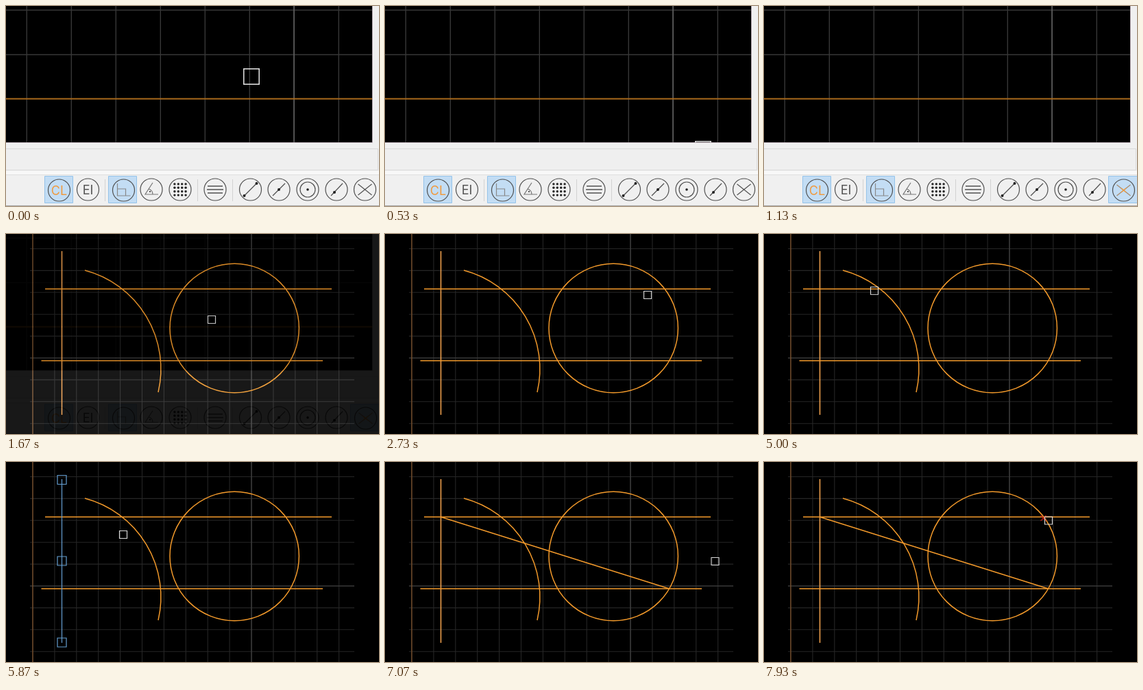
Animation of 544x292 px, one loop 8000 ms. Source, as an HTML page:

```html
<!DOCTYPE html>
<html lang="en">
<head>
<meta charset="utf-8">
<title>Intersection snap</title>
<style>
html, body { margin: 0; width: 100%; height: 100%; overflow: hidden; background: #000; }
svg { display: block; width: 544px; height: 292px; }
.icons { fill: none; stroke: #505050; stroke-width: 1.2; }
.icons .face { fill: #fbfbfb; }
.icons .dot { fill: #222; stroke: none; }
.icons text { stroke: none; font: 18px Inter, Arial, sans-serif; text-anchor: middle; }
.active { fill: #c3ddf4; stroke: #94c3ea; stroke-width: 1; }
.draft { fill: none; stroke: #f39a2b; stroke-width: 1.5; }
.grips { fill: none; stroke: #659fd2; stroke-width: 1.2; }

/* One 8 s clock drives everything: 1% = 80 ms */
.anim { animation: 8s linear infinite both; }
.drawing { animation-name: dissolve; }
.reach { animation-name: reach; animation-timing-function: ease-in-out; }
.press { animation-name: press; animation-timing-function: step-end; }
.tour { animation-name: tour; animation-timing-function: ease-in-out; }
.snap { animation-name: snap; animation-timing-function: step-end; }
.picked { animation-name: picked; animation-timing-function: step-end; }
.plain { animation-name: plain; animation-timing-function: step-end; }
.result { animation-name: result; animation-timing-function: step-end; }

@keyframes dissolve { 0%, 15% { opacity: 0 } 21.5%, 100% { opacity: 1 } }
@keyframes reach {
  0%, .8% { transform: translate(358px, 103px) }
  10.8%, 100% { transform: translate(523px, 268px) }
}
@keyframes press { 0% { opacity: 0 } 10.87%, 100% { opacity: 1 } }
@keyframes tour {
  0%, 21% { transform: translate(300px, 125px) }
  27% { transform: translate(262px, 84px) }
  34.1% { transform: translate(383px, 89px) }
  37.5% { transform: translate(411px, 83px) }
  43.5% { transform: translate(417px, 188px) }
  48.5% { transform: translate(256px, 188px) }
  52.4%, 55% { transform: translate(228.5px, 187px) }
  59.1%, 60.5% { transform: translate(171px, 83px) }
  69.1% { transform: translate(82px, 81px) }
  73.36% { transform: translate(82px, 81px); animation-timing-function: step-end }
  73.37%, 74.9% { transform: translate(171px, 106px) }
  82.5%, 85.8% { transform: translate(417px, 187px) }
  88.3%, 89.2% { transform: translate(481.5px, 145px) }
  96% { transform: translate(428px, 95px) }
  99.1%, 100% { transform: translate(415px, 85.5px) }
}
@keyframes snap {
  0% { transform: translate(258.5px, 80.5px); opacity: 0 }
  26% { transform: translate(258.5px, 80.5px); opacity: 1 }
  28.5% { transform: translate(407.5px, 80.5px); opacity: 0 }
  36.5% { transform: translate(407.5px, 80.5px); opacity: 1 }
  39% { transform: translate(414.5px, 185px); opacity: 0 }
  42.8% { transform: translate(414.5px, 185px); opacity: 1 }
  44.5% { transform: translate(251px, 185px); opacity: 0 }
  48% { transform: translate(251px, 185px); opacity: 1 }
  49.5% { transform: translate(225.5px, 185px); opacity: 0 }
  51.8% { transform: translate(225.5px, 185px); opacity: 1 }
  55.8% { transform: translate(168.5px, 80.5px); opacity: 0 }
  58.5% { transform: translate(168.5px, 80.5px); opacity: 1 }
  62% { transform: translate(81.5px, 80.5px); opacity: 0 }
  67.5% { transform: translate(81.5px, 80.5px); opacity: 1 }
  73.37% { transform: translate(414.5px, 185px); opacity: 0 }
  81.8% { transform: translate(414.5px, 185px); opacity: 1 }
  85.9% { transform: translate(407.5px, 82px); opacity: 0 }
  98.2%, 100% { transform: translate(407.5px, 82px); opacity: 1 }
}
@keyframes picked { 0% { opacity: 0 } 73.37% { opacity: 1 } 85.87%, 100% { opacity: 0 } }
@keyframes plain { 0% { opacity: 1 } 73.37% { opacity: 0 } 85.87%, 100% { opacity: 1 } }
@keyframes result { 0% { opacity: 0 } 84.12%, 100% { opacity: 1 } }
</style>
</head>
<body>
<svg viewBox="0 0 544 292">
  <defs>
    <clipPath id="viewport"><path d="M0 0H534V199H0z"/></clipPath>
    <circle id="face" class="face" r="16"/>
  </defs>

  <g>
    <path d="M0 0H544V292H0z" fill="#f0f0f0"/>
    <path d="M0 0H534V199H0z"/>
    <path d="M0 199.5H534.5V0" fill="none" stroke="#c9bcc4"/>
    <g clip-path="url(#viewport)">
      <g id="coarse" stroke="#373737" stroke-width="1.4"></g>
      <path d="M420 0V199" stroke="#666" stroke-width="1.4"/>
      <path d="M0 135.5H534" stroke="#a96a1c" stroke-width="1.8"/>
      <path class="anim reach" d="M-11.2 -11.2H11.2V11.2H-11.2z" fill="none" stroke="#e8e8e8" stroke-width="1.5"/>
    </g>
    <path d="M-1 208.500H542.500V239.500H-1z" fill="#efefef" stroke="#dadada"/>
    <path d="M0 241H544V246H0z" fill="#f8f8f8"/>
    <path d="M0 246.500H544" stroke="#dedede"/>
    <path d="M0 291.500H544" stroke="#a8a8a8"/>
    <path d="M144.500 253V285M279.500 253V285M330.500 253V285" stroke="#d2d2d2"/>

    <g class="icons">
      <path class="active" d="M56.500 248.500H97.500V287.500H56.500zM149.500 248.500H190.500V287.500H149.500z"/>
      <g transform="translate(77.5 269)"><use href="#face"/><text y="6.500" fill="#f09a3e">CL</text></g>
      <g transform="translate(119.500 268)"><use href="#face"/><text y="6.500" fill="#555">EI</text></g>
      <g transform="translate(171.500 269)"><use href="#face"/><path d="M-9 -10V8H10M-9 -2H3V8" stroke="#888"/></g>
      <g transform="translate(212 268)"><use href="#face"/><path d="M2 -10L-9 7H10M-4 -1Q2 1 2 7" stroke="#777"/><circle class="dot" cx="-2" cy="3" r="1"/></g>
      <g transform="translate(254 268)"><use href="#face"/><g id="dots" class="dot"></g></g>
      <g transform="translate(305 268)"><use href="#face"/><path d="M-11 -5H11M-12 0H12M-11 5H11" stroke-width="1.500"/></g>
      <g transform="translate(356.500 268)"><use href="#face"/><path d="M-9 9L9 -9"/><circle class="dot" cx="-9" cy="9" r="2"/><circle class="dot" cx="9" cy="-9" r="2"/></g>
      <g transform="translate(398 268)"><use href="#face"/><path d="M-9 9L9 -9"/><circle class="dot" r="2"/></g>
      <g transform="translate(440 268)"><use href="#face"/><circle r="11"/><circle class="dot" r="1.800"/></g>
      <g transform="translate(482 268)"><use href="#face"/><path d="M-8 9L9 -9"/><circle class="dot" cx="-3" cy="4" r="2"/></g>
      <g transform="translate(523.500 268)"><use href="#face"/><path d="M-10 -8L10 8M-10 8L10 -8"/></g>
      <g class="anim press">
        <path class="active" d="M502.500 248.500H545V287.500H502.500z"/>
        <g transform="translate(524.500 269)"><use href="#face"/><path d="M-10 -8L10 8M-10 8L10 -8" stroke="#a88a6a"/><path d="M-3.500 -3L3.500 3M-3.500 3L3.500 -3" stroke="#f09a3e"/></g>
      </g>
    </g>
  </g>

  <g class="anim drawing">
    <path d="M0 0H544V292H0z"/>
    <g id="fine" stroke="#262626" stroke-width="1.1"></g>
    <path d="M358 0V292M35 181H508" stroke="#454545" stroke-width="1.100"/>
    <path d="M39 0V292" stroke="#7d512b" stroke-width="1.300"/>
    <g class="draft">
      <path class="anim plain" d="M81.500 25V264" stroke="#f8a750"/>
      <path d="M57 80.300H475M51.500 185H462"/>
      <path d="M115 53A149 149 0 0 1 222 231"/>
      <circle cx="333.200" cy="137.500" r="94.200"/>
      <path class="anim result" d="M81.500 80.300L414.500 185"/>
    </g>
    <g class="anim picked grips">
      <path d="M81.500 25V264"/>
      <path d="M75 19.500h13v13h-13zM75 138h13v13h-13zM75 257h13v13h-13z"/>
    </g>
    <path class="anim snap" d="M-4 -4L4 4M-4 4L4 -4" stroke="#c81e14" stroke-width="1.200"/>
    <path class="anim tour" d="M-5.500 -5.500H5.500V5.500H-5.500z" fill="none" stroke="#d8d8d8" stroke-width="1.200"/>
  </g>
</svg>
<script>
const lines = (count, make) => Array.from({ length: count }, (_, i) => make(i)).join('');
const fill = (id, markup) => { document.getElementById(id).innerHTML = markup; };

fill('coarse', `<path d="${lines(8, i => `M${30.3 + 65 * i} 0V199`)}M0 6H534M0 71H534"/>`);
fill('fine', `<path d="${lines(15, i => `M${39 + 31.9 * i} 0V292`)}${lines(9, i => `M35 ${21.5 + 31.9 * i}H508`)}"/>`);
fill('dots', lines(16, i => `<circle cx="${(i % 4) * 5.4 - 8.1}" cy="${(i >> 2) * 5.4 - 8.1}" r="1.7"/>`));
</script>
</body>
</html>
```
